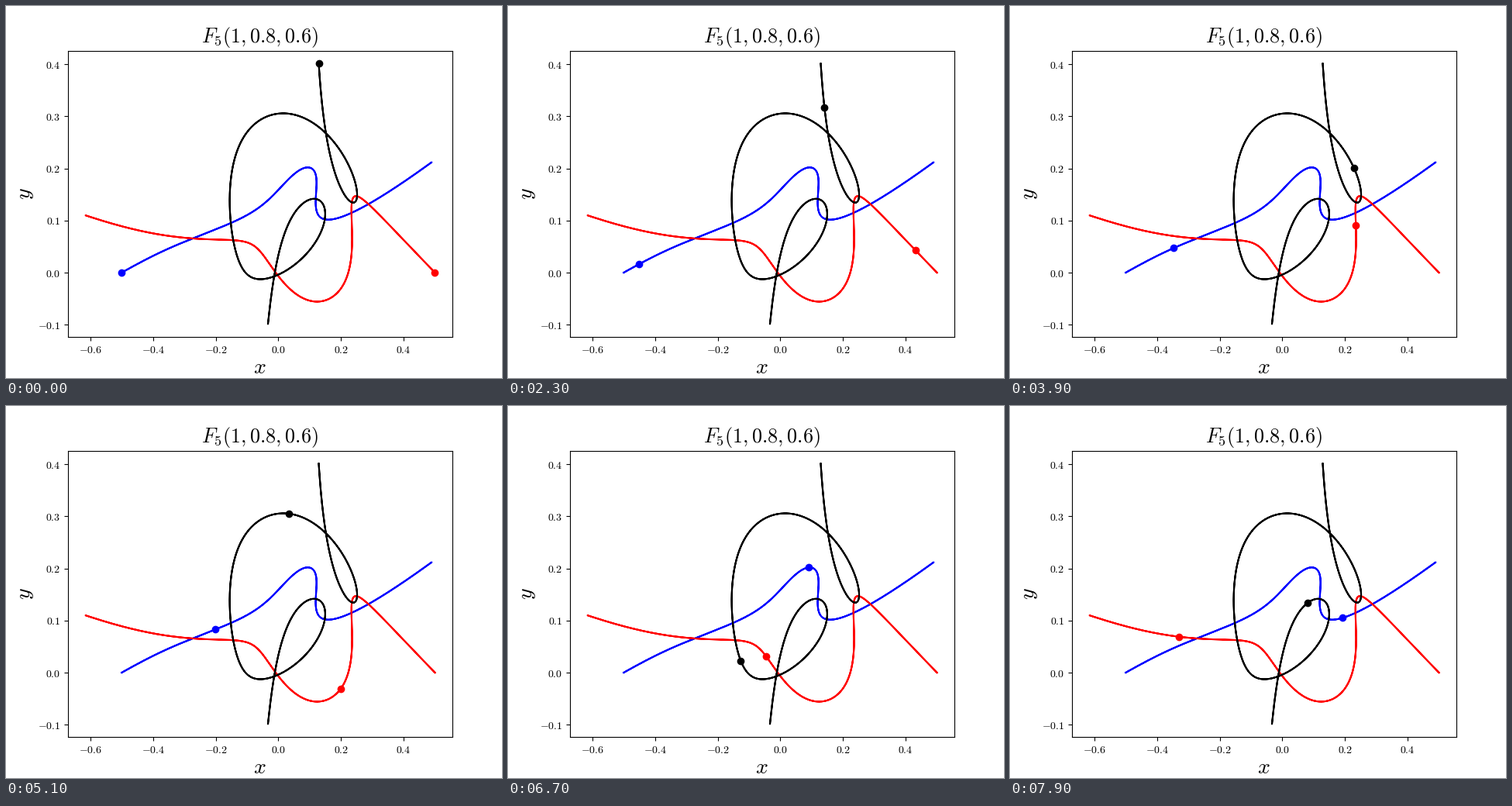
These frames come from a looping animation (640x480 px, 8000 ms). A matplotlib script:

```python
import numpy as np
import matplotlib.pyplot as plt
from matplotlib.animation import FuncAnimation

plt.rcParams["mathtext.fontset"] = "cm"

FRAMES, INTERVAL = 80, 100
COLORS = ["blue", "red", "black"]
MASS = np.array([1, 0.8, 0.6])
PAIRS = np.outer(MASS, MASS) * (1 - np.eye(3)) / 2

# Screen positions (x + iy) the three bodies pass at these steps.
STEPS = np.array([0, 10, 23, 39, 51, 67, 79])
WAYPOINTS = np.array([
    [149.5 + 344.2j, 153 + 342.4j, 169 + 333j, 212 + 312j,
     271 + 288j, 387 + 208.3j, 428 + 274j],
    [553.5 + 344.2j, 548.2 + 338.2j, 525.3 + 314.3j, 446 + 285.3j,
     431 + 365.3j, 334 + 324j, 219.3 + 298j],
    [404 + 74.4j, 404.3 + 85j, 409.2 + 133j, 443 + 206.2j,
     364 + 139.2j, 300 + 328.2j, 385 + 253.4j],
])


def screen(q):
    return 351.45 + 404 * q.real + 1j * (344.2 - 673.3 * q.imag)


def slope(s):
    """Newtonian gravity in a stretched time that slows near encounters."""
    q, v = s[:, :3], s[:, 3:6]
    d = q[:, None, :] - q[:, :, None]
    r = np.abs(d) + np.eye(3)
    acc = (MASS * d / r**3).sum(axis=2)
    g = (PAIRS / r).sum(axis=(1, 2))[:, None] ** -1.5
    return g * np.concatenate([v, acc, np.ones_like(g)], axis=1)


def fly(starts, until, h=0.025):
    """Drop the bodies from rest; columns: 3 positions, 3 velocities, time."""
    s = np.zeros((len(starts), 7), complex)
    s[:, 0], s[:, 1], s[:, 2] = -0.5, 0.5, starts
    track = [s]
    while s[:, 6].real.min() < until and len(track) < 2500:
        k1 = slope(s)
        k2 = slope(s + h / 2 * k1)
        k3 = slope(s + h / 2 * k2)
        k4 = slope(s + h * k3)
        s = s + h / 6 * (k1 + 2 * k2 + 2 * k3 + k4)
        track.append(s)
    return np.array(track)


def at(times, track, first=0):
    t = track[:, 6].real
    return np.array([np.interp(times, t, track[:, first + i]) for i in range(3)])


def residual(track, dt, half, count, weight):
    miss = screen(at(STEPS[:count] * dt, track)) - WAYPOINTS[:, :count]
    rest = weight * at([half], track, 3)
    c = np.concatenate([miss.ravel(), rest.ravel()])
    return np.concatenate([c.real, c.imag])


def refine(p, count, weight=0.0, rounds=8, eps=1e-6):
    """Levenberg-Marquardt on x, y of the third body, time step, half period."""
    trial, best, lam = p, np.inf, 1e-3
    for _ in range(rounds):
        x, y, dt, half = trial
        z = x + 1j * y
        until = half + 0.1 if weight else STEPS[count - 1] * dt * 1.05
        run = fly(np.array([z, z + eps, z + 1j * eps]), until)
        args = count, weight
        r = residual(run[:, 0], dt, half, *args)
        cost = r @ r
        if cost < best:
            jac = np.array([
                residual(run[:, 1], dt, half, *args) - r,
                residual(run[:, 2], dt, half, *args) - r,
                residual(run[:, 0], dt + eps, half, *args) - r,
                residual(run[:, 0], dt, half + eps, *args) - r,
            ]).T / eps
            p, best, grad = trial, cost, jac.T @ r
            hess, lam = jac.T @ jac, max(lam / 10, 1e-8)
        else:
            lam *= 20
        step = np.linalg.solve(hess + lam * np.diag(hess.diagonal() + 1e-9), -grad)
        if np.abs(step).max() < 1e-9:
            break
        trial = p + step
    return p


def solve_orbit():
    p = np.array([0.130, 0.401, 0.0101, 1.24])
    for count in range(4, len(STEPS) + 1):
        p = refine(p, count)
    # The orbit turns back where all three bodies come to rest.
    last = STEPS[-1] * p[2]
    track = fly(np.array([p[0] + 1j * p[1]]), last + 0.65)[:, 0]
    t = track[:, 6].real
    energy = (MASS * np.abs(track[:, 3:6]) ** 2).sum(axis=1)
    energy[(t < last + 0.25) | (t > last + 0.65)] = np.inf
    p[3] = t[energy.argmin()]
    p = refine(p, len(STEPS), 300)
    return refine(p, len(STEPS), 1e4)


x0, y0, dt, half = solve_orbit()
track = fly(np.array([x0 + 1j * y0]), half + 0.02)[:, 0]
way = track[track[:, 6].real < half, :3].T
way = np.hstack([way, at([half], track)])
way = np.hstack([way, way[:, ::-1]])
spots = at(np.arange(FRAMES) * dt, track)

fig, ax = plt.subplots(figsize=(6.4, 4.8), dpi=100)
for q, color in zip(way, COLORS):
    ax.plot(q.real, q.imag, color=color)
dots = [ax.plot([q[0].real], [q[0].imag], "o", color=color)[0]
        for q, color in zip(spots, COLORS)]


def tick_text(value, _):
    return f"${round(value, 1) + 0.0:.1f}$"


ax.set_xticks(np.arange(-3, 3) * 0.2)
ax.set_yticks(np.arange(-1, 5) * 0.1)
ax.xaxis.set_major_formatter(tick_text)
ax.yaxis.set_major_formatter(tick_text)


def label(x, y, text, size, **kw):
    fig.text(x / 640, 1 - y / 480, text, fontsize=size,
             ha="center", va="baseline", **kw)


label(327.5, 47, "$F_5(1, 0.8, 0.6)$", 18.8)
label(327.5, 474.5, "$x$", 20)
label(31.5, 242.4, "$y$", 20, rotation=90, rotation_mode="anchor")


def update(i):
    for dot, q in zip(dots, spots):
        dot.set_data([q[i].real], [q[i].imag])
    return dots


anim = FuncAnimation(fig, update, frames=FRAMES, interval=INTERVAL,
                     repeat=True, repeat_delay=0)
plt.show()
```
